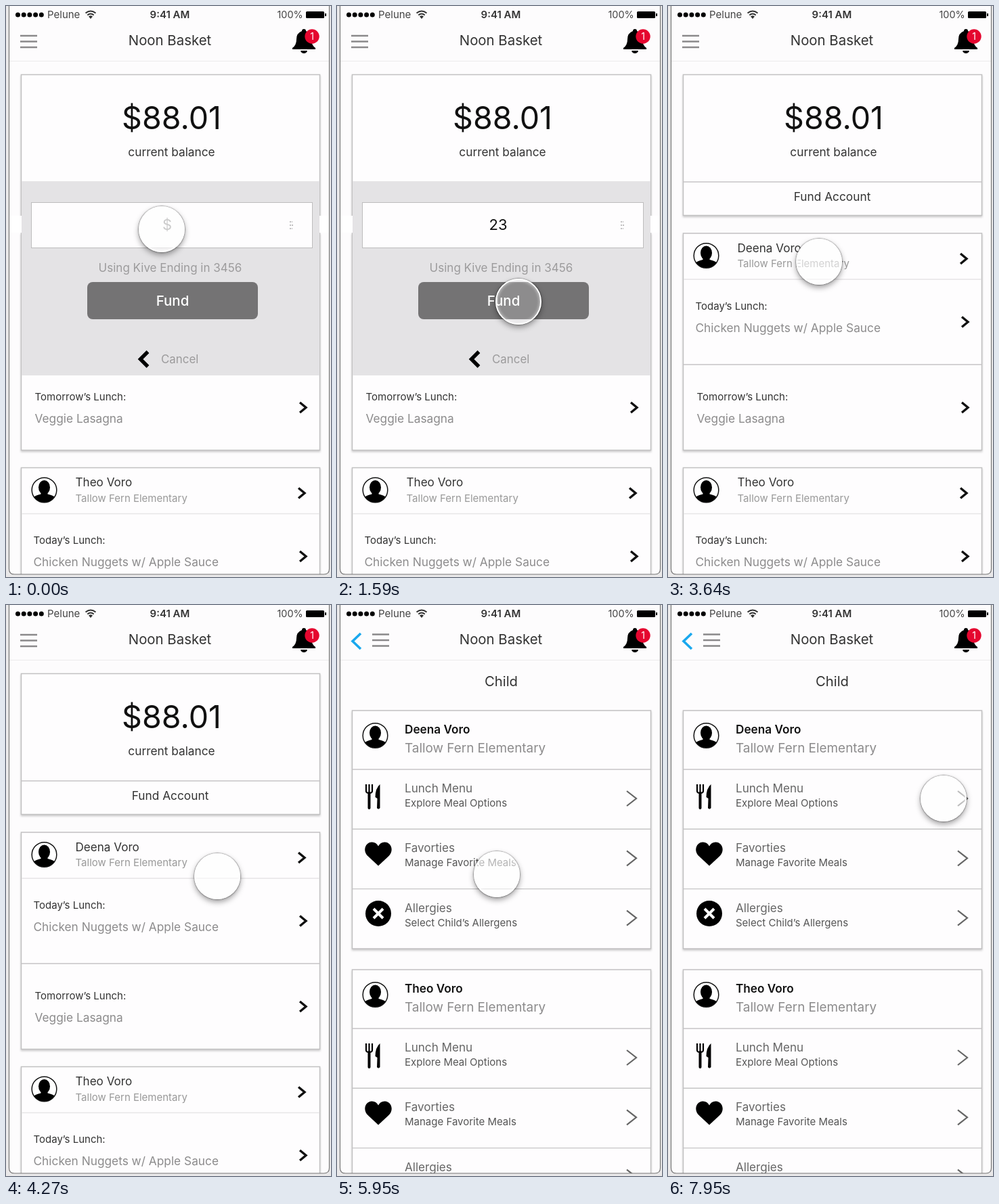
Animation of 480 by 844 pixels, one loop 8000 ms. Source, as an HTML page:

```html
<!DOCTYPE html>
<html lang="en">
<head>
<meta charset="utf-8">
<title>Lunch app</title>
<style>
  html, body { margin: 0; width: 100%; height: 100%; overflow: hidden; background: #e9e8e9; }
  svg { position: absolute; left: 0; top: 0; font-family: Inter, Roboto, sans-serif; }
  .card { fill: #fefdfe; stroke: #c2c1c2; stroke-width: 1.5; filter: drop-shadow(0 2px 1.5px rgba(0, 0, 0, .2)); }
  #cursor {
    position: absolute; left: -34px; top: -34px; width: 64px; height: 64px;
    border: 2px solid #fff; border-radius: 50%;
    box-shadow: 0 0 1.5px .7px rgba(0, 0, 0, .4), 0 4px 8px rgba(0, 0, 0, .38),
      inset 0 0 5px rgba(255, 255, 255, .7);
  }
</style>
</head>
<body>
<svg id="stage" width="480" height="844" viewBox="0 0 480 844"></svg>
<div id="cursor"></div>
<script>
const DURATION = 8000;
const FORM_CLOSES = 1820, CHILD_OPENS = 5050;
const SCHOOL = 'Tallow Fern Elementary';
const CHILDREN = ['Deena Voro', 'Theo Voro'];

const text = (x, y, size, fill, str, extra = '') =>
  `<text x="${x}" y="${y}" font-size="${size}" fill="${fill}" ${extra}>${str}</text>`;
const centered = (x, y, size, fill, str, extra = '') =>
  text(x, y, size, fill, str, `text-anchor="middle" ${extra}`);
const path = (d, stroke, width, extra = '') =>
  `<path d="${d}" fill="none" stroke="${stroke}" stroke-width="${width}" ${extra}/>`;
const shape = (d, fill = '#000') => `<path d="${d}" fill="${fill}"/>`;
const rect = (x, y, w, h, attrs) => `<rect x="${x}" y="${y}" width="${w}" height="${h}" ${attrs}/>`;
const group = (x, y, body) => `<g transform="translate(${x} ${y})">${body}</g>`;
const divider = (y, color = '#c6c5c6') => path(`M23 ${y}H463`, color, 1.4);
const card = (top, bottom) => rect(22.5, top + .5, 441, bottom - top, 'class="card"');

const chevron = (x, y) => path(`M${x - 5} ${y - 7.5}l9 7.5l-9 7.5`, '#111', 3.4);
const thinChevron = y => path(`M428 ${y - 11}l14 11l-14 11`, '#666', 2.2);
const hamburger = (x, y) => path(`M${x} ${y - 8.5}h25m-25 8.5h25m-25 8.5h25`, '#8a898a', 2.4);

const avatar = (x, y) => group(x, y,
  '<circle r="18.3" fill="#fff" stroke="#111" stroke-width="1.5"/>' +
  '<ellipse cy="-4" rx="8.5" ry="10.5"/>' +
  shape('M-5 0H5V6Q13 8 15 10A18 18 0 0 1-15 10Q-13 8-5 6Z'));

const cutlery = (x, y) => group(x, y,
  path('M-11-18v10q0 3 4.5 3q4.5 0 4.5-3v-10M-6.5-18v14', '#000', 2.2) +
  path('M-6.5-5V17', '#000', 4, 'stroke-linecap="round"') +
  shape('M9.5-18Q2.5-12 2.5 1L5.5 3L5 17Q7 20 9.5 17Z'));

const heart = (x, y) => group(x, y,
  shape('M0 18L-15 4C-24-4-19-17-9.5-17Q-3-17 0-11Q3-17 9.5-17C19-17 24-4 15 4Z'));

const crossBadge = (x, y) => group(x, y,
  '<circle r="19"/>' + path('M-7-7L7 7M7-7L-7 7', '#fff', 4));

const bell = group(440, 0,
  shape('M0 34Q3 34 3 37Q11 40 11 49Q11 58 17 62V64H-17V62Q-11 58-11 49Q-11 40-3 37Q-3 34 0 34Z') +
  shape('M-5 66H5Q4 70 0 70Q-4 70-5 66Z') +
  '<circle cx="12" cy="45" r="10.7" fill="#e5062f"/>' +
  centered(12, 50, 14, '#fff', '1'));

const statusBar =
  [0, 1, 2, 3, 4].map(i => `<circle cx="${17.5 + 8.7 * i}" cy="13" r="3.5"/>`).join('') +
  text(61, 18, 15, '#444', 'Pelune') +
  path('M117.5 10.5Q125 4.5 132.5 10.5M120.3 13.5Q125 9.5 129.7 13.5', '#333', 2) +
  shape('M122 15.5Q125 13 128 15.5L125 19Z', '#333') +
  centered(242, 18, 15, '#333', '9:41 AM', 'font-weight="600"') +
  text(400.5, 18, 14.4, '#444', '100%') +
  rect(443, 8, 27, 10, 'rx="1.5"') + rect(471, 11, 2, 4, '');

const header = statusBar +
  centered(242, 58, 20.4, '#333', 'Noon Basket') + bell + path('M5 81.5H477', '#ecebec', 1);

const lunch = (x, y, day, meal) =>
  text(x, y, 15, '#333', `${day}’s Lunch:`) + text(x, y + 33, 17.3, '#8c8b8c', meal);

const homeChild = (name, top, bottom) => card(top, bottom) +
  avatar(56.5, top + 33.5) +
  text(102.5, top + 28, 17.1, '#333', name) +
  text(102.5, top + 50.5, 15, '#999', SCHOOL) +
  chevron(437, top + 38) + divider(top + 68.5, '#e6e5e6') +
  lunch(40.5, top + 113, 'Today', 'Chicken Nuggets w/ Apple Sauce') + chevron(439, top + 131.5) +
  divider(top + 194.5) +
  lunch(42.5, top + 247, 'Tomorrow', 'Veggie Lasagna') + chevron(439, top + 258);

const home = hamburger(21, 52.5) + card(101, 309) +
  centered(244.5, 182, 46.5, '#111', '$88.01') +
  centered(244.5, 222, 17.3, '#333', 'current balance') +
  divider(260) + centered(242.5, 288, 17.3, '#333', 'Fund Account') +
  homeChild(CHILDREN[0], 335.5, 656) + homeChild(CHILDREN[1], 682, 1003);

const form =
  rect(5, 310, 18, 25, 'fill="#fff"') + rect(463, 310, 14, 25, 'fill="#fff"') +
  rect(23, 259, 440, 287, 'fill="#e4e3e5"') +
  rect(37.5, 290.5, 415, 67, 'fill="#fefdfe" stroke="#bdbcbd"') +
  path('M419 319h4m-4 5h5m-5 5h4', '#aaa', 1.4, 'stroke-dasharray="2 1"') +
  centered(238, 331, 22, '#888', '$', 'id="amount"') +
  centered(242.5, 393, 17, '#9c9b9c', 'Using Kive Ending in 3456') +
  rect(120, 408, 252, 55, 'rx="8" fill="#747374"') +
  centered(246, 443, 20.5, '#fff', 'Fund', 'font-weight="500"') +
  path('M209.5 511L198.5 522L209.5 533', '#000', 5.4) +
  text(229, 528, 16.9, '#9c9b9c', 'Cancel');

const MENU = [
  ['Lunch Menu', 'Explore Meal Options', cutlery(54, 283)],
  ['Favorties', 'Manage Favorite Meals', heart(61, 367.5)],
  ['Allergies', 'Select Child’s Allergens', crossBadge(61, 456)],
];
const childCard = (name, shift, iconCount) => group(0, shift, card(155.5, 507.5) +
  avatar(56.5, 193) +
  text(100, 190, 17.2, '#111', name, 'font-weight="600"') +
  text(100, 218, 18.9, '#8c8b8c', SCHOOL) +
  MENU.map(([title, note, icon], i) => {
    const y = 243 + 88.3 * i;
    return divider(y) + (i < iconCount ? icon : '') + text(100, y + 34, 17.1, '#666', title) +
      text(100, y + 55, 15, '#555', note) + thinChevron(y + 43);
  }).join(''));

const child = path('M35 42L23 53.5L35 65', '#1aa8ee', 3.6) + hamburger(52, 52) +
  centered(242.5, 120, 20.3, '#333', 'Child') +
  childCard(CHILDREN[0], 0, 3) + childCard(CHILDREN[1], 383, 2);

const frame = 'M4.5-10H477.5V832Q477.5 840 469.5 840H12.5Q4.5 840 4.5 832Z';
document.getElementById('stage').innerHTML =
  `<clipPath id="screen"><path d="${frame}"/></clipPath>` + shape(frame, '#fdfcfd') +
  `<g clip-path="url(#screen)">${header}<g id="home">${home}</g><g id="form">${form}</g>` +
  `<g id="child">${child}</g></g>` + path(frame, '#777', 1.2);

// time, x, y of the touch cursor
const TRACK = [
  [0, 230, 330], [450, 230, 330], [820, 268, 331], [1150, 268, 331], [1500, 268, 437],
  [1860, 268, 437], [2590, 264, 506], [2760, 262, 513], [3230, 213, 378], [3450, 214, 378],
  [3640, 223, 378], [4050, 270, 410], [4600, 360, 384], [5000, 362, 383], [5150, 362, 383],
  [5720, 240, 420], [5950, 236, 398], [6680, 262, 364], [7500, 372, 313], [7900, 407, 286],
  [8000, 407, 286],
];
const PRESSES = [[130, 350], [1510, 1740], [4700, 4960]];

const slope = (i, axis) => {
  const a = TRACK[i], b = TRACK[i + 1];
  return a && b ? (b[axis] - a[axis]) / (b[0] - a[0]) : 0;
};
// Harmonic mean of neighbouring slopes: smooth without overshoot.
const tangent = (i, axis) => {
  const p = slope(i - 1, axis), q = slope(i, axis);
  return p * q > 0 ? 2 * p * q / (p + q) : 0;
};
function position(t, axis) {
  let i = 0;
  while (i < TRACK.length - 2 && t >= TRACK[i + 1][0]) i++;
  const a = TRACK[i], b = TRACK[i + 1], span = b[0] - a[0], u = (t - a[0]) / span;
  const ease = u * u * (3 - 2 * u);
  return a[axis] + (b[axis] - a[axis]) * ease +
    span * (tangent(i, axis) * u * (1 - u) ** 2 - tangent(i + 1, axis) * u * u * (1 - u));
}
const pressure = t => Math.max(...PRESSES.map(([from, to]) =>
  Math.max(0, Math.min(1, (t - from) / 60, (to - t) / 60))));

const byId = id => document.getElementById(id);
const amount = byId('amount'), cursor = byId('cursor');
const show = (id, visible) => byId(id).setAttribute('display', visible ? 'inline' : 'none');

function draw(now) {
  const t = now % DURATION;
  show('home', t < CHILD_OPENS);
  show('form', t < FORM_CLOSES);
  show('child', t >= CHILD_OPENS);
  amount.textContent = t < 980 ? '$' : t < 1130 ? '2' : '23';
  amount.setAttribute('fill', t < 980 ? '#888' : '#111');
  cursor.style.transform = `translate(${position(t, 1)}px, ${position(t, 2)}px)`;
  cursor.style.background = `rgba(255, 255, 255, ${.56 - .38 * pressure(t)})`;
}

const start = performance.now();
function tick() {
  draw(performance.now() - start);
  requestAnimationFrame(tick);
}
tick();
</script>
</body>
</html>
```
